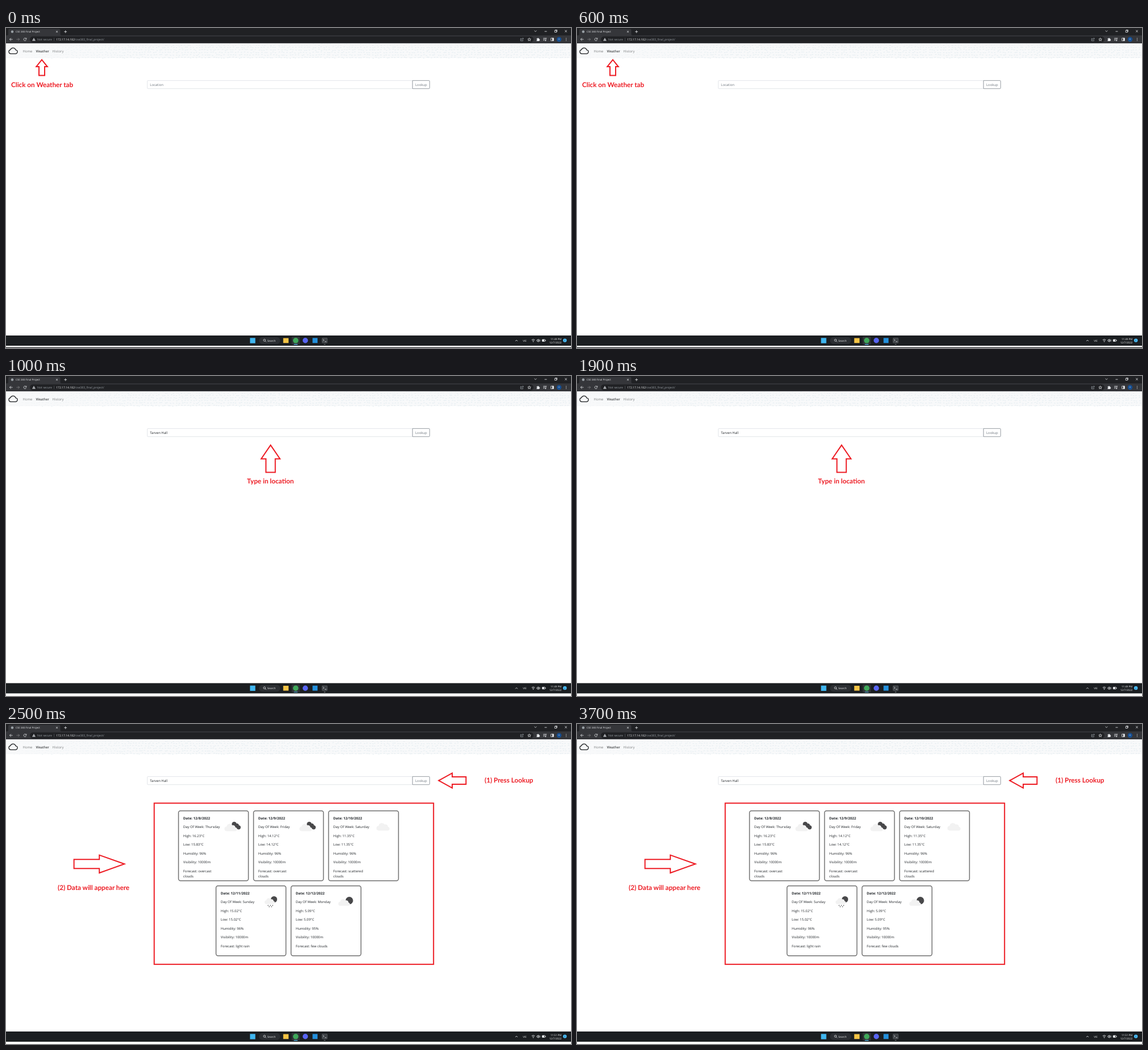
An HTML page for the animation above (4.5 s loop, 994x563 px).

```html
<!DOCTYPE html>
<html lang="en">
<head>
<meta charset="utf-8">
<title>Weather lookup guide</title>
<style>
html, body { margin: 0; width: 100%; height: 100%; overflow: hidden; background: #fff; }
svg { display: block; width: 994px; height: 563px; }
text { font-family: "Open Sans", "Noto Sans", sans-serif; font-size: 5.95px; fill: #212529; text-rendering: geometricPrecision; white-space: pre; }
.note { font-family: Lato, sans-serif; font-weight: 700; font-size: 11.7px; fill: #ed1c24; }
.mark { fill: none; stroke: #ed1c24; stroke-width: 2; stroke-linejoin: miter; }
.ico { fill: none; stroke: #e8eaed; stroke-width: .8; }
.mute { stroke: #9aa0a6; }
</style>
</head>
<body>
<svg id="stage" viewBox="0 0 994 563" xmlns="http://www.w3.org/2000/svg">
  <rect width="994" height="563" fill="#fff"/>

  <g id="browser">
    <rect width="994" height="27" fill="#202124"/>
    <path d="M0 13H2Q4 13 4 11V4Q4 1.5 6.5 1.5H93Q95.500 1.500 95.500 4V11Q95.500 13 98 13H994V27H0Z" fill="#35363a"/>
    <rect x="42" y="14.800" width="886" height="10.600" rx="5.300" fill="#202124"/>
    <circle cx="11" cy="6.500" r="2.300" fill="#9aa0a6"/>
    <path class="ico" d="M88 5l3 3m0-3l-3 3M102.300 6.500h4.800M104.700 4.100v4.800"/>
    <path class="ico" d="M929.600 4.500l1.900 1.900l1.900-1.900M947.500 6h4M965.300 4.300h3.200v3.200h-3.200zM966.200 4.200v-.8h3.200v3.200h-.8M983.200 3.800l3.600 3.600m0-3.600l-3.600 3.600"/>
    <path class="ico" d="M11.600 20H6.400M8.800 17.600L6.400 20l2.400 2.400"/>
    <path class="ico" stroke-opacity=".4" d="M18.400 20h5.200M21.200 17.600L23.600 20l-2.400 2.400"/>
    <path class="ico" d="M35.300 18.700a2.300 2.300 0 1 0 .3 2M35.900 17.400v1.900h-1.900"/>
    <path d="M49 17.300l2.900 5.200h-5.800z" fill="#c4c7cb"/>
    <path d="M49 19.200v1.500M49 21.300v.6" stroke="#202124" stroke-width=".6"/>
    <path d="M84.600 17.200v5.600" stroke="#5f6368" stroke-width=".6"/>
    <path class="ico mute" d="M907 18.600h-1.700v4h4.200v-1.400M906.800 21q.3-2.300 3-2.300M908.800 17.200l1.700 1.500l-1.700 1.500"/>
    <path class="ico" stroke-width=".6" d="M920.600 17.500l.8 1.700l1.900.2l-1.400 1.300l.4 1.900l-1.700-1l-1.700 1l.4-1.900l-1.400-1.300l1.900-.2z"/>
    <path d="M933.500 18.500h1.500a1 1 0 0 1 2 0h1.300v1.500a1 1 0 0 1 0 2v.9h-4.800v-1.300a.9.900 0 0 0 0-1.800z" fill="#e8eaed"/>
    <path class="ico" d="M945.200 18h4.600M945.200 19.800h3.200M945.200 21.600h2.200M949.800 22V18h1.500"/>
    <circle cx="949.200" cy="22" r=".9" fill="#e8eaed"/>
    <path class="ico" d="M958.700 17.800h4.600v4.600h-4.600z"/>
    <rect x="961" y="17.600" width="2.500" height="5" fill="#e8eaed"/>
    <circle cx="973" cy="20" r="4.200" fill="#174f91"/>
    <g fill="#e8eaed"><circle cx="985.500" cy="18" r=".6"/><circle cx="985.500" cy="20" r=".6"/><circle cx="985.500" cy="22" r=".6"/></g>
  </g>

  <g id="nav">
    <rect y="27" width="994" height="26" fill="#f8f9fa"/>
    <path id="waves" fill="none" stroke="#dce8ec" stroke-width=".8"/>
    <rect y="27" width="240" height="26" fill="url(#fade)"/>
    <path d="M8.600 45.300H16.500a3.300 3.300 0 0 0 .5-6.600a4.900 4.900 0 0 0-9.300-.3a3.500 3.500 0 0 0 .9 6.900z" fill="none" stroke="#1b1d1f" stroke-width="1.300"/>
  </g>
  <defs>
    <linearGradient id="fade"><stop offset="0" stop-color="#f8f9fa" stop-opacity=".85"/><stop offset="1" stop-color="#f8f9fa" stop-opacity="0"/></linearGradient>
  </defs>

  <g id="form" fill="#fff">
    <rect x="248.600" y="92.400" width="466.600" height="14.300" rx="1.500" stroke="#ced4da" stroke-width=".6"/>
    <path d="M715.200 92.400H743.800q1.500 0 1.500 1.500v11.300q0 1.500-1.500 1.500H715.200z" stroke="#6c757d" stroke-width=".7"/>
  </g>

  <g id="step0">
    <path class="mark" d="M63 55.800L72.800 68H68V83.400H58V68H53.300Z"/>
  </g>
  <g id="step1">
    <path class="mark" d="M465.500 121.600L482 145.700H473.700V169.400H457.300V145.700H449Z"/>
  </g>
  <g id="step2">
    <path class="mark" d="M761.300 99.500L785 86.400V93H809.300V106H785V112.600Z"/>
    <path class="mark" d="M208.300 246.200L164.200 230.600V238.300H119.600V254.300H164.200V262Z"/>
    <rect class="mark" x="260.700" y="139.300" width="491.500" height="283.500"/>
  </g>

  <g id="taskbar">
    <rect y="541" width="994" height="18" fill="#1b1e21"/>
    <rect x="429.300" y="545.300" width="9.300" height="9.300" fill="#3fb6f0"/>
    <rect x="445" y="544" width="37.500" height="11.800" rx="5.900" fill="#2b2e32"/>
    <circle class="ico" cx="454.700" cy="549.300" r="1.800"/>
    <path class="ico" d="M456 550.600l1.800 1.800"/>
    <rect x="487.700" y="545.600" width="9.400" height="8.600" fill="#f6c445"/>
    <rect x="502.500" y="543" width="14.500" height="14" rx="1.500" fill="#2f3236"/>
    <circle cx="509.700" cy="549.800" r="4.800" fill="#3fa85a"/>
    <rect x="506.300" y="556" width="6.800" height="1.200" rx=".6" fill="#5cc3f5"/>
    <circle cx="526.600" cy="549.800" r="4.700" fill="#5865f2"/>
    <rect x="539.300" y="545.400" width="8.800" height="8.800" fill="#2490dc"/>
    <rect x="556" y="545.600" width="9.200" height="8.400" rx=".8" fill="#3b3f43" stroke="#85898d" stroke-width=".4"/>
    <path class="ico" d="M557.600 547.600l1.900 1.700l-1.900 1.700M560.800 551.800h2.800"/>
    <rect x="559.300" y="556.200" width="2.600" height=".9" rx=".4" fill="#9a9da0"/>
    <path class="ico" d="M896.100 551l2-2l2 2"/>
    <path class="ico" d="M924.800 548.800q2.800-2.500 5.600 0M925.900 550.200q1.700-1.500 3.400 0"/>
    <circle cx="927.600" cy="551.700" r=".8" fill="#e8eaed"/>
    <path class="ico" stroke-width=".6" d="M934 548.800h1l1.500-1.400v4.900l-1.500-1.400h-1zM937.600 548.600q.9 1.200 0 2.500M938.600 547.700q1.700 2.100 0 4.300"/>
    <rect class="ico" x="943.300" y="548" width="5.200" height="3.400" rx=".6"/>
    <path d="M943.300 548h3.600v3.400h-3.600zM949 549h.8v1.400h-.8z" fill="#e8eaed"/>
    <circle cx="983.200" cy="549.600" r="3.200" fill="#4cc2ff"/>
  </g>
  <rect id="edge" y="561.800" width="994" height="1.200" fill="#1b1e21"/>
</svg>
<script>
const NS = "http://www.w3.org/2000/svg";
const $ = id => document.getElementById(id);

function add(parent, tag, attrs) {
  const el = document.createElementNS(NS, tag);
  for (const k in attrs) el.setAttribute(k, attrs[k]);
  return parent.appendChild(el);
}

function label(parent, x, y, str, style = "", attrs = {}) {
  const el = add(parent, "text", { x, y, style, ...attrs });
  el.textContent = str;
  return el;
}

const font = (size, fill) => `font-size:${size}px;fill:${fill}`;

// Browser, navigation and form text
const bar = $("browser"), nav = $("nav"), form = $("form"), task = $("taskbar");
label(bar, 17, 8.1, "CSE 383 Final Project", font(4.45, "#e8eaed"));
label(bar, 55, 21.9, "Not secure", font(5.15, "#9aa0a6"));
label(bar, 88.2, 21.9, "172.17.14.182", font(5, "#f1f3f4"));
label(bar, 120.6, 21.9, "/cse383_final_project/", font(5.15, "#9aa0a6"));
label(bar, 973, 21.4, "H", font(3.8, "#c9d8ea"), { "text-anchor": "middle" });
label(nav, 29.5, 42.8, "Home", "fill:#7d7f80");
label(nav, 52.5, 42.8, "Weather", "fill:#17191b");
label(nav, 81.6, 42.8, "History", "fill:#7d7f80");
const place = label(form, 253.3, 101.7, "");
label(form, 720, 101.7, "Lookup", "fill:#6c757d");

// Taskbar text
const pale = font(4.6, "#f1f3f4"), end = { "text-anchor": "end" };
label(task, 459.8, 551.5, "Search", pale);
label(task, 909.3, 551.5, "VIE", font(4.5, "#f1f3f4"));
const clock = label(task, 977.4, 548.5, "", font(4.5, "#f1f3f4"), end);
label(task, 977.4, 554.5, "12/7/2022", pale, end);
label(task, 983.2, 551.2, "2", font(4, "#10222c"), { "text-anchor": "middle" });

// Notes
const note = (step, x, y, str) => label($("step" + step), x, y, str, "", { class: "note" });
note(0, 9, 103.8, "Click on Weather tab");
note(1, 424, 189.1, "Type in location");
note(2, 842, 102.8, "(1) Press Lookup");
note(2, 91, 292, "(2) Data will appear here");

// Pale squiggles behind the navigation
let seed = 7;
const rnd = () => (seed = (seed * 16807) % 2147483647) / 2147483647;
let d = "";
for (let x = 2; x < 992; x += 5) {
  for (let y = 29; y < 52; y += 4.5) {
    const a = rnd() * 3, b = rnd() * 4 - 2;
    d += `M${(x + a).toFixed(1)} ${(y + rnd()).toFixed(1)}q1.2 ${b.toFixed(1)} 2.6 ${(b / 3).toFixed(1)}`;
  }
}
$("waves").setAttribute("d", d);

// Weather icons, drawn around the icon centre
const LIGHT = "#f2f2f2", DARK = "#48484a";
const cloud = (x, y, s) =>
  `M${x - 9 * s} ${y + 6 * s}a${4.2 * s} ${4.2 * s} 0 0 1 ${.6 * s} ${-8.3 * s}` +
  `a${5.8 * s} ${5.8 * s} 0 0 1 ${10.6 * s} ${-2.4 * s}a${4.4 * s} ${4.4 * s} 0 0 1 ${5.8 * s} ${4 * s}` +
  `a${3.5 * s} ${3.5 * s} 0 0 1 ${.6 * s} ${6.7 * s}z`;

const disc = (g, cx, cy, r) => add(g, "circle", { cx, cy, r, fill: DARK });
const puff = (g, x, y, s) => add(g, "path", { d: cloud(x, y, s), fill: LIGHT });

const icons = {
  overcast(g, x, y) {
    disc(g, x + 1.5, y - 4.3, 4.2);
    disc(g, x + 6, y - 1.6, 3.8);
    disc(g, x + 9.3, y + 1.3, 3.6);
    puff(g, x - 4, y + 2.2, .95);
  },
  scattered(g, x, y) { puff(g, x, y + 1, 1); },
  rain(g, x, y) {
    disc(g, x + 5.5, y - 4, 5.5);
    puff(g, x - 1.5, y - .5, .78);
    for (let i = 0; i < 5; i++) {
      const px = x - 4.5 + i * 2, py = y + 6 + (i % 2) * 2.2;
      add(g, "path", { d: `M${px} ${py}l-.8 1.4`, stroke: DARK, "stroke-width": 1.2 });
    }
  },
  few(g, x, y) {
    disc(g, x + 6, y - 1.8, 6.6);
    puff(g, x - 2.5, y + 2, .88);
  }
};

// Forecast cards
function card(x, y, date, day, high, low, humid, forecast, icon) {
  const g = $("step2"), tx = x + 8.3;
  add(g, "rect", { x, y, width: 123, height: 123, rx: 3.4, fill: "#fff", stroke: "#707070", "stroke-width": 1.5 });
  icons[icon](g, x + 96.5, y + 27.8);
  label(g, tx, y + 15, "Date: " + date, "font-weight:700;font-size:6.1px");
  const rows = [`Day Of Week: ${day}`, `High: ${high}°C`, `Low: ${low}°C`, `Humidity: ${humid}%`, "Visibility: 10000m"];
  rows.forEach((row, i) => label(g, tx, y + 30.5 + i * 15.55, row));
  forecast.split("|").forEach((line, i) => label(g, tx, y + 108.2 + i * 9.4, line));
}
const top1 = 152.7, top2 = 284.7;
card(303.5, top1, "12/8/2022", "Thursday", "16.23", "15.83", 96, "Forecast: overcast|clouds", "overcast");
card(435.5, top1, "12/9/2022", "Friday", "14.12", "14.12", 96, "Forecast: overcast|clouds", "overcast");
card(567.5, top1, "12/10/2022", "Saturday", "11.35", "11.35", 96, "Forecast: scattered|clouds", "scattered");
card(369.5, top2, "12/11/2022", "Sunday", "15.02", "15.02", 96, "Forecast: light rain", "rain");
card(501.5, top2, "12/12/2022", "Monday", "5.09", "5.09", 95, "Forecast: few clouds", "few");

const LOOP = 4500;
let shown = -1;

function draw(ms) {
  const t = ms % LOOP, step = t < 1000 ? 0 : t < 2500 ? 1 : 2;
  if (step === shown) return;
  shown = step;
  for (let i = 0; i < 3; i++) $("step" + i).style.display = i === step ? "" : "none";
  place.textContent = step ? "Tarven Hall" : "Location";
  place.style.fill = step ? "#212529" : "#6c757d";
  clock.textContent = step === 2 ? "11:51 PM" : "11:49 PM";
  task.setAttribute("transform", `translate(0 ${step === 1 ? -.6 : 0})`);
  $("edge").style.display = step ? "none" : "";
}

const start = performance.now();
function tick() {
  draw(performance.now() - start);
  requestAnimationFrame(tick);
}
tick();
</script>
</body>
</html>
```
